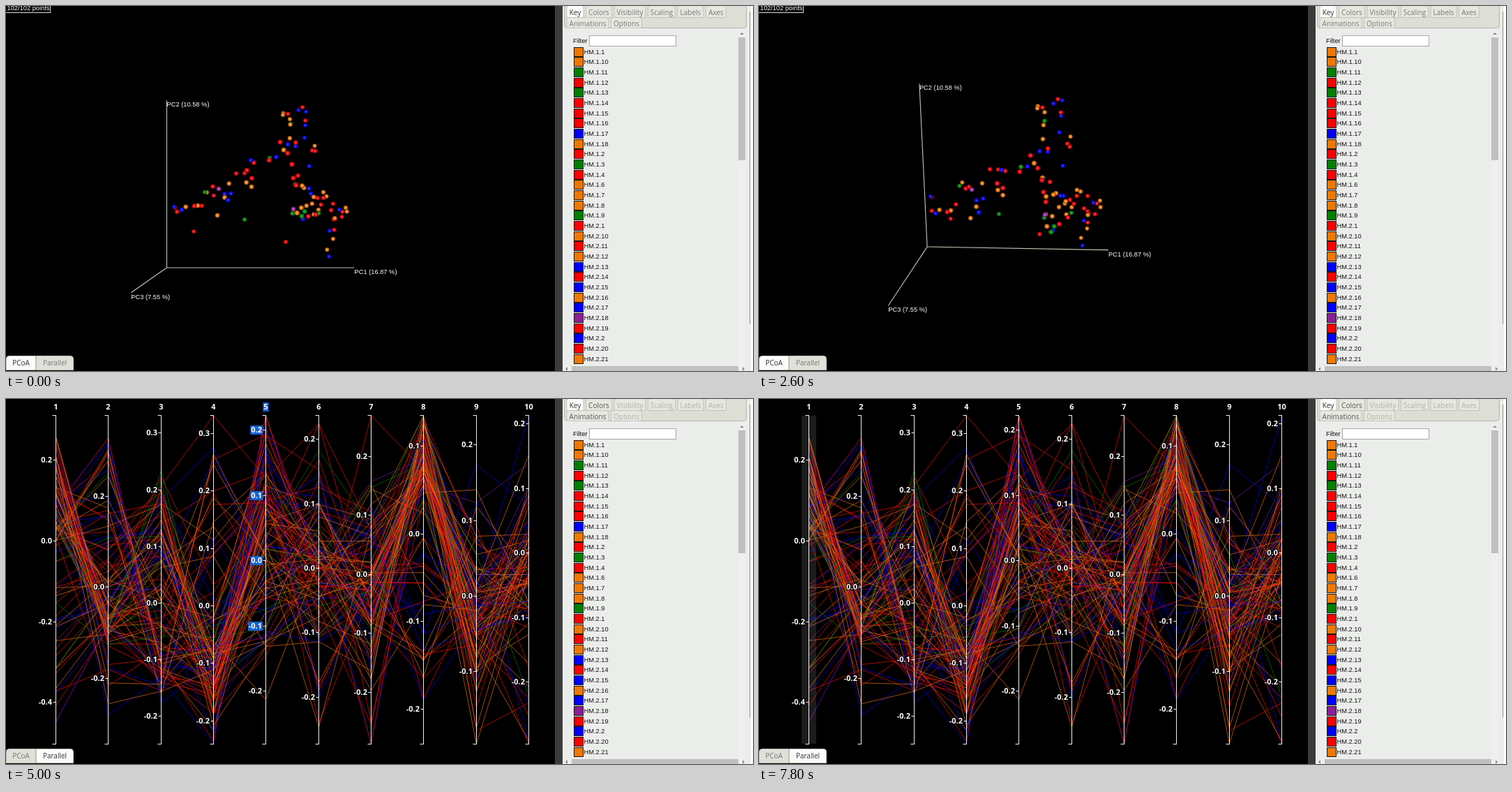
Animation of 1071x523 px, one loop 8 s. Source, as an HTML page with a canvas:

```html
<!DOCTYPE html>
<html lang="en">
<head>
<meta charset="utf-8">
<title>Ordination viewer</title>
<style>
html, body { margin: 0; width: 100%; height: 100%; overflow: hidden; background: #fff; }
canvas { display: block; }
</style>
</head>
<body>
<canvas id="stage" width="1071" height="523"></canvas>
<script>
const ctx = document.getElementById('stage').getContext('2d');
const LOOP = 8000, STEP = 200, SWITCH_AT = 4000;
const CX = 393.5, CY = 261, FOCAL = 829, DIST = 744;
const ARIAL = '9.3px "Liberation Sans", Arial, sans-serif';
const UI = '10px "Open Sans", sans-serif';
const BOLD = 'bold 11px "Open Sans", sans-serif';
const COLORS = { r: '#ff0000', o: '#f07800', b: '#0000ff', g: '#008000', p: '#8c1f96' };
const LINES = { r: '#f01000', o: '#e87014', b: '#0000e6', g: '#007800', p: '#702090' };
const GLOW = {
  r: ['#ff4a4a', '#f40c14', '#700008'], o: ['#ffb050', '#ee8418', '#6c3804'],
  b: ['#4a4aff', '#0c0cf4', '#000070'], g: ['#3cb83c', '#0c8c14', '#043c08'],
  p: ['#d470dc', '#a838b0', '#481450']
};

let seed = 11;
function rand() {
  seed = (seed * 1664525 + 1013904223) % 4294967296;
  return seed / 4294967296;
}
const spread = a => (rand() * 2 - 1) * a;
const gauss = () => (rand() + rand() + rand() + rand() - 2) * 1.7;
const lerp = (a, b, k) => a + (b - a) * k;
const clamp = (v, lo, hi) => Math.max(lo, Math.min(hi, v));

// Key samples along the arch (front-view x, y, depth), then four stray ones
const ANCHORS = [
  242,289,-48, 252,292,30, 275,286,34, 288,267,-49, 305,262,8, 318,278,65,
  330,240,-22, 352,259,43, 351,221,46, 378,218,40, 410,227,60, 393,195,60,
  415,201,23, 408,169,-17, 397,156,-34, 425,145,-41, 429,171,-53, 439,207,-41,
  416,257,76, 437,269,10, 455,275,-12, 412,291,32, 424,301,80, 448,292,-12,
  487,289,-40, 472,305,-25, 464,322,-50, 463,359,-45,
  303,300,25, 269,323,-53, 342,306,-20, 401,338,-28
];
const ANCHOR_COLORS = 'rboopbrobgorbgorbrrbrpgoorbborgr';

function makePoints() {
  const front = [...ANCHOR_COLORS].map((color, i) => {
    const [x, y, z] = ANCHORS.slice(i * 3, i * 3 + 3);
    return { x, y, z, color };
  });
  const arch = front.length - 4;
  for (let i = 0; i < arch - 1; i++) {
    const a = front[i], b = front[i + 1];
    const count = i > 16 && i < 25 ? 4 : 2; // denser on the right
    for (let n = 0; n < count; n++) {
      const k = (n + 0.3 + rand() * 0.6) / count;
      front.push({
        x: lerp(a.x, b.x, k) + spread(7), y: lerp(a.y, b.y, k) + spread(7),
        z: clamp(lerp(a.z, b.z, k) + spread(18), -82, 110),
        color: 'rrrrooobbg'[Math.floor(rand() * 10)]
      });
    }
  }
  return front.map(({ x, y, z, color }) => {
    const k = (DIST - z) / FOCAL;
    return { x: (x - CX) * k, y: (CY - y) * k, z, color };
  });
}
const points = makePoints();

// Time, yaw and pitch in degrees
const VIEW = [
  [0, 0, 0], [600, -6, 11], [800, -6, 11], [2000, -20, 37.6],
  [3200, 14.2, -9], [4000, 14.2, -9]
];
function viewAt(t) {
  const i = Math.max(1, VIEW.findIndex(v => v[0] >= t));
  const a = VIEW[i - 1], b = VIEW[i], k = (t - a[0]) / (b[0] - a[0]);
  return [1, 2].map(n => lerp(a[n], b[n], k) * Math.PI / 180);
}

function projector([yaw, pitch]) {
  const cb = Math.cos(yaw), sb = Math.sin(yaw), ca = Math.cos(pitch), sa = Math.sin(pitch);
  return ({ x, y, z }) => {
    const px = x * cb + z * sb, pz = z * cb - x * sb;
    const py = y * ca - pz * sa, depth = y * sa + pz * ca;
    const s = FOCAL / (DIST - depth);
    return { x: CX + px * s, y: CY - py * s, s };
  };
}

function rect(x, y, w, h, fill, stroke) {
  ctx.fillStyle = fill;
  ctx.fillRect(x, y, w, h);
  if (stroke) {
    ctx.strokeStyle = stroke;
    ctx.lineWidth = 1;
    ctx.strokeRect(x + 0.5, y + 0.5, w - 1, h - 1);
  }
}
function round(x, y, w, h, radii, fill, stroke) {
  ctx.beginPath();
  ctx.roundRect(x + 0.5, y + 0.5, w - 1, h - 1, radii);
  ctx.fillStyle = fill;
  ctx.fill();
  ctx.strokeStyle = stroke;
  ctx.lineWidth = 1;
  ctx.stroke();
}
function text(str, x, y, font, fill, align = 'left') {
  ctx.font = font;
  ctx.textAlign = align;
  ctx.fillStyle = fill;
  ctx.fillText(str, x, y);
}
function line(x1, y1, x2, y2, color, width = 1) {
  ctx.strokeStyle = color;
  ctx.lineWidth = width;
  ctx.beginPath();
  ctx.moveTo(x1, y1);
  ctx.lineTo(x2, y2);
  ctx.stroke();
}
function triangle(x, y, dx, dy) {
  ctx.fillStyle = '#8a8a8a';
  ctx.beginPath();
  ctx.moveTo(x + dx * 2, y + dy * 2);
  ctx.lineTo(x - dx + dy * 3, y - dy + dx * 3);
  ctx.lineTo(x - dx - dy * 3, y - dy - dx * 3);
  ctx.fill();
}

function drawSphere({ x, y, s, color }) {
  const r = 3 * s, [light, mid, dark] = GLOW[color];
  const g = ctx.createRadialGradient(x, y, 0, x, y, r);
  g.addColorStop(0, light);
  g.addColorStop(0.55, mid);
  g.addColorStop(1, dark);
  ctx.fillStyle = g;
  ctx.beginPath();
  ctx.arc(x, y, r, 0, Math.PI * 2);
  ctx.fill();
}

const CORNER = { x: -163, y: -114, z: -85 };
const AXIS_ENDS = [
  ['PC1 (16.87 %)', { x: 106 }], ['PC2 (10.58 %)', { y: 126 }], ['PC3 (7.55 %)', { z: 113 }]
];
function drawScatter(t) {
  const project = projector(viewAt(t)), o = project(CORNER);
  const tips = AXIS_ENDS.map(([label, end]) => ({ label, ...project({ ...CORNER, ...end }) }));
  tips.forEach(p => line(o.x, o.y, p.x, p.y, '#c4c4b4', 1.1));
  points.map(p => ({ ...project(p), color: p.color }))
    .sort((a, b) => a.s - b.s).forEach(drawSphere);
  tips.forEach(p => text(p.label, p.x, p.y + 9, ARIAL, '#fff'));
  rect(-1, -8, 65, 18, '#000', '#ddd');
  text('102/102 points', 1.5, 6, ARIAL, '#fff');
}

const TOP = 24, BOTTOM = 494;
const axisX = i => Math.round(71 + i * 75.35) + 0.5;
// Height of zero and tick distance on each axis
const SCALES = [
  [203, 115.6], [269, 130.5], [292, 81.2], [296, 82.4], [231, 93.5],
  [242, 92.3], [250.5, 84.5], [192.5, 125.6], [282, 108.3], [220, 92.5]
];
// Main cluster on each later axis: share, centre, width
const CLUSTERS = [
  [0.6, 400, 45], [0.55, 190, 75], [0.75, 235, 60], [0.75, 250, 60],
  [0.6, 85, 32], [0.75, 325, 60], [0.75, 230, 50]
];
function makeParallel() {
  const layer = document.createElement('canvas');
  layer.width = 787;
  layer.height = 523;
  const c = layer.getContext('2d');
  c.globalAlpha = 0.68;
  c.lineWidth = 1;
  const scale = (v, max, range) => TOP + (max - v) / range * (BOTTOM - TOP);
  points.forEach(p => {
    const ys = [scale(p.x, 106, 269), scale(p.y, 126, 240), scale(p.z, 113, 198)];
    CLUSTERS.forEach(([share, center, width]) =>
      ys.push(rand() < share ? center + gauss() * width : 250 + gauss() * 115));
    c.strokeStyle = LINES[p.color];
    c.beginPath();
    ys.forEach((y, i) => c.lineTo(axisX(i), clamp(y, TOP, BOTTOM)));
    c.stroke();
  });
  return layer;
}
const parallel = makeParallel();

function axisText(str, x, y, align, selected) {
  ctx.font = BOLD;
  ctx.textAlign = align;
  if (selected) {
    const w = ctx.measureText(str).width;
    rect(align === 'right' ? x - w - 1 : x - w / 2 - 1, y - 10, w + 2, 13, '#1464d2');
  } else {
    ctx.strokeStyle = '#000';
    ctx.lineWidth = 2;
    ctx.strokeText(str, x, y);
  }
  text(str, x, y, BOLD, '#fff', align);
}
function isSelected(t, axis, label) {
  if (t < 5000 || t >= 7400) return false;
  if (axis === 4) return label !== '-0.2';
  if (t < 5200) return false;
  return axis === 5 || (axis === 6 && label === '-0.2');
}
function brush(axis) {
  rect(Math.round(axisX(axis) - 10.5), TOP, 21, BOTTOM - TOP, 'rgba(255,255,255,0.11)');
}
function drawParallel(t) {
  ctx.drawImage(parallel, 0, 0);
  if (t >= 5800 && t < 6200) brush(6);
  if (t >= 7800) brush(0);
  SCALES.forEach(([zero, gap], i) => {
    const x = axisX(i), unit = i < 2 ? 0.2 : 0.1, ink = '#f0f0f0';
    line(x, TOP, x, BOTTOM, ink);
    [TOP - 0.5, BOTTOM + 0.5].forEach(y => line(x - 5, y, x + 0.5, y, ink));
    for (let k = -3; k <= 3; k++) {
      const y = Math.round(zero - k * gap);
      if (y < TOP || y > BOTTOM) continue;
      line(x - 4, y + 0.5, x, y + 0.5, ink);
      const label = (k * unit).toFixed(1);
      axisText(label, x - 5.5, y + 4, 'right', isSelected(t, i, label));
    }
    const title = String(i + 1);
    axisText(title, x, 15, 'center', isSelected(t, i, title));
  });
}

const TAB_ROWS = [
  ['Key', 'Colors', 'Visibility', 'Scaling', 'Labels', 'Axes'], ['Animations', 'Options']
];
function drawTabRow(labels, row, isParallel) {
  let x = 803.5;
  labels.forEach(label => {
    ctx.font = UI;
    const w = Math.round(ctx.measureText(label).width) + 8;
    const active = label === 'Key';
    const enabled = label === 'Colors' || label === 'Animations';
    round(x, row * 17 - 1, w, 18 - row * 2, [3, 3, 0, 0], active ? '#fcfdfb' : '#e6e8e0', '#c2c4ba');
    const ink = active ? '#333' : !isParallel ? '#777' : enabled ? '#555' : '#b0b2aa';
    text(label, x + w / 2, 12.5 + row * 16.5, UI, ink, 'center');
    x += w + 2.5;
  });
}

// Key entries sorted as text, so 10 follows 1
const groupNames = (group, last, skip) => Array.from({ length: last }, (_, i) => i + 1)
  .filter(n => !skip.includes(n)).map(n => `HM.${group}.${n}`).sort();
const NAMES = [...groupNames(1, 18, [5]), ...groupNames(2, 21, [])].slice(0, 31);
const SWATCHES = 'oogrgrrrborgrooogrorobrbobprbro';

function drawPanel(isParallel) {
  rect(787, 0, 11, 523, '#3b3b3b');
  rect(798, 0, 273, 523, '#ebedeb');
  rect(1068, 0, 3, 523, '#fff');
  round(800, -6, 262, 38, 4, '#dddfd6', '#b4b6ac');
  TAB_ROWS.forEach((labels, row) => drawTabRow(labels, row, isParallel));
  text('Filter', 813, 53, ARIAL, '#111');
  rect(836, 42, 125, 16, '#fff', '#a8aaa8');

  ctx.save();
  ctx.beginPath();
  ctx.rect(798, 40, 250, 474);
  ctx.clip();
  NAMES.forEach((name, i) => {
    const y = 65 + i * 14.67;
    rect(814, Math.round(y - 6.5), 14, 14, COLORS[SWATCHES[i]], '#181818');
    text(name, 828.5, y + 3.5, ARIAL, '#111');
  });
  ctx.restore();

  rect(1050, 35, 10, 481, '#eeefee');
  rect(1050, 45, 10, 176, '#bfc0bf');
  triangle(1055, 40, 0, -1);
  rect(800, 516, 260, 7, '#eeefee');
  rect(811, 516, 239, 7, '#bfc0bf');
  triangle(804, 520, -1, 0);
  triangle(1057, 520, 1, 0);
  rect(1066, 8, 1, 448, '#96989a');
}

function drawViewTab(label, x, w, radii, active) {
  round(x, 501, w, 21, radii, active ? '#fbfcfa' : '#dfe1d9', '#bfc1b8');
  text(label, x + w / 2, 514.5, UI, active ? '#333' : '#777', 'center');
}

function draw(t) {
  const isParallel = t >= SWITCH_AT;
  rect(0, 0, 787, 523, '#000');
  if (isParallel) drawParallel(t); else drawScatter(t);
  drawViewTab('PCoA', 0, 43, [4, 0, 0, 0], !isParallel);
  drawViewTab('Parallel', 43, 54, [0, 4, 0, 0], isParallel);
  drawPanel(isParallel);
}

function tick(now) {
  draw(Math.floor(now % LOOP / STEP) * STEP);
  requestAnimationFrame(tick);
}
requestAnimationFrame(tick);
</script>
</body>
</html>
```
